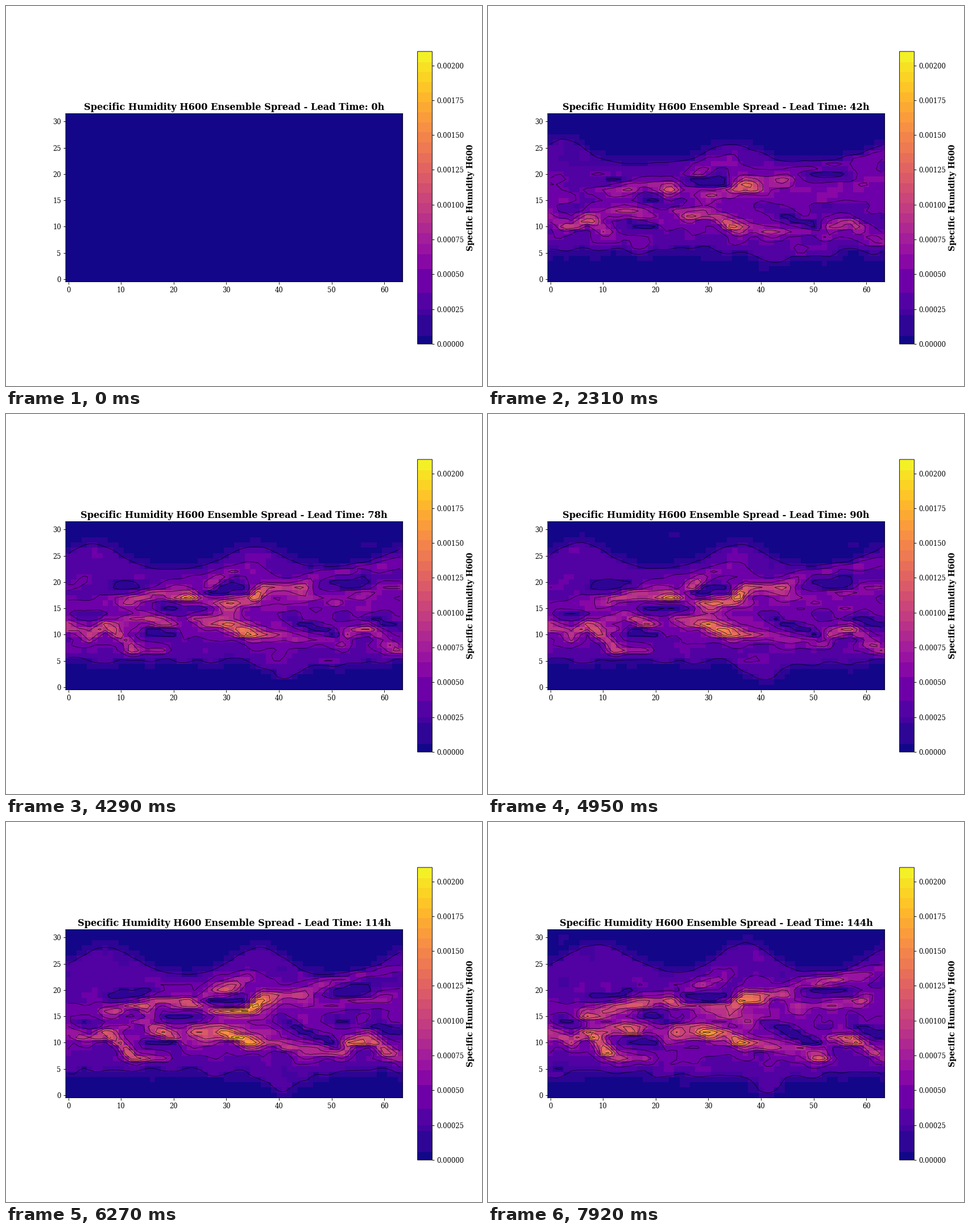
A matplotlib script that plays this animation: 837 by 669 pixels, repeating every 8000 ms.

```python
import numpy as np
import matplotlib.pyplot as plt
from matplotlib.animation import FuncAnimation
from matplotlib.colors import ListedColormap

W, H, DPI = 837, 669, 83.7
TICK_MS, STEP_MS, LOOP_MS = 40, 330, 8000
NX, NY = 64, 32
VMAX = 21.0          # all values are in units of 1e-4
LAST_HOUR = 144

plt.rcParams.update({"font.family": "DejaVu Serif", "font.size": 10,
                     "path.snap": False})

# Moist (+) and dry (-) streaks: strength, x of the peak, points along the path
STREAKS = [
    (8, 16, [(7, 16), (16, 17.4), (24, 18), (28, 20.5), (34, 22.5)]),
    (9, 37, [(23, 17.5), (28, 16.3), (34, 16.5), (37, 18.6), (45, 18.8)]),
    (5, 53, [(44, 19.5), (48, 21.5), (54, 22.5), (63, 23.8)]),
    (4, 57, [(45, 17.3), (50, 17), (57, 18.2), (63, 19)]),
    (8, 8, [(0, 12), (4, 10.3), (7, 11.8), (13, 7.3), (18, 6.8)]),
    (6, 14, [(9, 12), (14, 13.2), (18, 12.8), (22, 10.4), (26, 11)]),
    (11, 33, [(24, 12.5), (29, 12.3), (33, 11), (38, 9.6), (52, 8)]),
    (8, 56, [(53, 10.2), (57, 11), (60, 9), (63, 7.3)]),
    (-7, 29, [(25, 18.3), (33, 18.5)]),
    (-5, 46, [(40, 14), (45, 12), (51, 9.8)]),
    (-4, 61, [(57, 13), (63, 12)]),
    (-4, 54, [(50, 20), (57, 19.5)]),
    (-4, 18, [(15, 10.5), (20, 10)]),
    (-3, 12, [(8, 18.5), (15, 19.5)]),
    (-4, 21, [(18, 15), (25, 14.8)]),
    (-3, 4, [(2, 14), (6, 14)]),
    (-3, 52, [(51, 14), (53, 14)]),
]

COLS = np.arange(NX)
Y = np.arange(NY)[:, None]


def bump(v, centre, width):
    return np.exp(-((v - centre) / width) ** 2)


def mix(a, b, t):
    return a + (b - a) * t


def smooth_noise(count, sx, sy, seed):
    """Random maps, blurred more along x than along y, with unit spread."""
    raw = np.random.default_rng(seed).normal(size=(count, NY, NX))
    fx, fy = np.fft.fftfreq(NX), np.fft.fftfreq(NY)[:, None]
    blur = np.exp(-2 * np.pi ** 2 * ((fx * sx) ** 2 + (fy * sy) ** 2))
    out = np.fft.ifft2(np.fft.fft2(raw) * blur).real
    return out / out.std(axis=(1, 2), keepdims=True)


NOISE = smooth_noise(6, 1.4, 0.75, seed=12)


def noise_at(hour):
    pos = hour / LAST_HOUR * (len(NOISE) - 1)
    k = min(int(pos), len(NOISE) - 2)
    angle = (pos - k) * np.pi / 2
    return np.cos(angle) * NOISE[k] + np.sin(angle) * NOISE[k + 1]


def belt(y, t):
    """1 inside the moist belt, 0 towards both poles."""
    top = (mix(22, 23, t)
           + mix(4.5, 6, t) * bump(COLS, mix(1, 9, t), mix(5, 9, t))
           + mix(3.2, 6.3, t) * bump(COLS, mix(34, 37, t), 7)
           + mix(3.5, 5.6, t) * bump(COLS, 65, 7))
    bottom = mix(5.6, 3.9, t) - mix(1.8, 3.2, t) * bump(COLS, 41, 5)
    return 1 / ((1 + np.exp((y - top) / 0.4)) * (1 + np.exp((bottom - y) / 0.4)))


def streak(y, strength, peak, points):
    px, py = zip(*points)
    path = np.interp(COLS, px, py)
    width = 1.1 * np.hypot(1, np.gradient(path))
    beyond = COLS - np.clip(COLS, px[0], px[-1])
    along = (0.5 + 0.5 * bump(COLS, peak, 5)) * bump(beyond, 0, 1.5)
    return strength * along * bump(y, path, width)


def spread(hour):
    """Ensemble spread on the grid at one lead time."""
    if hour == 0:
        return np.zeros((NY, NX))
    t = max(hour - 18, 0) / (LAST_HOUR - 18)
    growth = t ** 0.6
    noise = noise_at(hour)

    y = Y + 0.3 * noise
    swell = mix(0.7, 2.2, growth) * bump(COLS, 34, 11) * bump(Y, 16, 7)
    inside = 2.4 + mix(1, 1.8, growth) * bump(Y, 13.5, 6.5) + swell
    inside = inside + mix(0.4, 1, growth) * sum(streak(y, *s) for s in STREAKS)
    field = 0.4 + belt(y, t) * np.maximum(inside, 0.8)
    return field * np.exp(0.14 * noise) * min(1, (hour / 18) ** 0.5)


def stepped_plasma():
    low = [0, 0.6, 2.1, 2.5, 3.7, 5.4]
    marks = np.append(low, np.linspace(6.5, VMAX, 21)) / VMAX
    band = np.searchsorted(marks, (np.arange(512) + 0.5) / 512) - 1
    return ListedColormap(plt.get_cmap("plasma")(mix(marks[:-1], marks[1:], 0.4)[band]))


def pixel_axes(left, top, right, bottom):
    return fig.add_axes([left / W, 1 - bottom / H,
                         (right - left) / W, (bottom - top) / H])


HOURS = range(0, LAST_HOUR + 1, 6)
FIELDS = [spread(h) for h in HOURS]
LEVELS = np.arange(2, 21, 2)

fig = plt.figure(figsize=((W + 0.01) / DPI, (H + 0.01) / DPI), dpi=DPI,
                 facecolor="white")
ax = pixel_axes(105, 189.5, 697.6, 485.6)
image = ax.imshow(FIELDS[0], origin="lower", aspect="auto", vmin=0, vmax=VMAX,
                  cmap=stepped_plasma(), interpolation="nearest")
ax.set(xlim=(-0.5, NX - 0.5), ylim=(-0.5, NY - 0.5),
       xticks=range(0, 61, 10), yticks=range(0, 31, 5))
title = ax.set_title("", fontsize=14, fontweight="bold")

bar = fig.colorbar(image, cax=pixel_axes(723.6, 80, 749.4, 595.1),
                   ticks=np.arange(0, VMAX, 2.5),
                   format=lambda v, _: f"{v * 1e-4:.5f}")
bar.set_label("Specific Humidity H600", fontsize=12, fontweight="bold")

lines = []


def show(step):
    while lines:
        lines.pop().remove()
    image.set_data(FIELDS[step])
    title.set_text("Specific Humidity H600 Ensemble Spread - "
                   f"Lead Time: {HOURS[step]}h")
    if FIELDS[step].max() > LEVELS[0]:
        lines.append(ax.contour(FIELDS[step], levels=LEVELS, colors="black",
                                linewidths=0.55))
    return image, title


def update(i):
    return show((i * TICK_MS + TICK_MS - 1) // STEP_MS)


def reset():
    return show(0)


anim = FuncAnimation(fig, update, frames=LOOP_MS // TICK_MS, init_func=reset,
                     interval=TICK_MS, repeat=True, blit=False)
plt.show()
```
